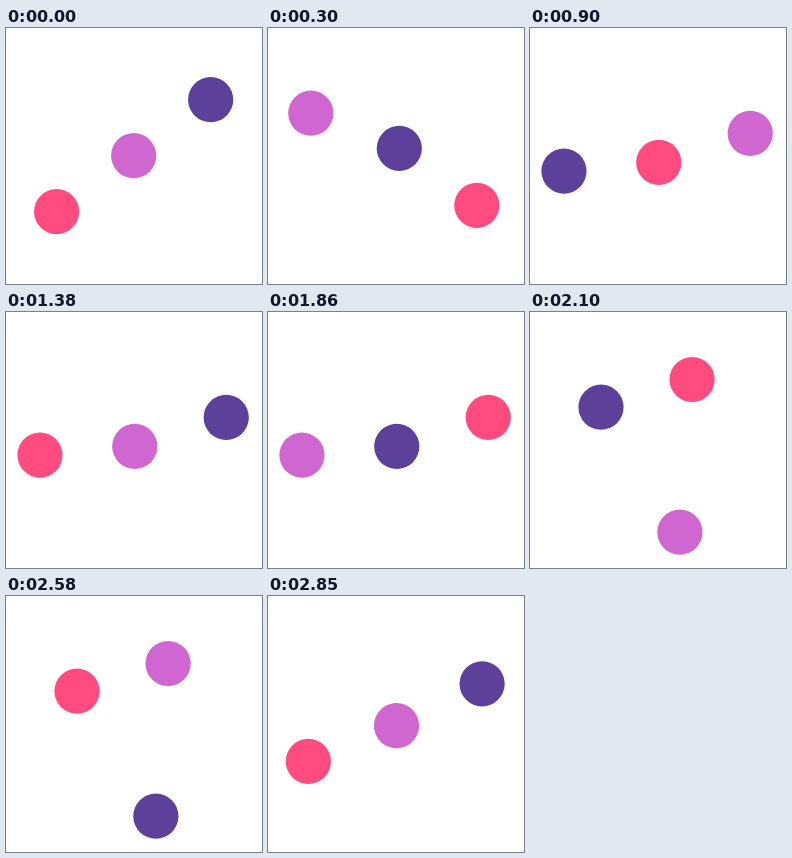
An HTML page for the animation above (2880 ms loop, 256 by 256 pixels).

```html
<!DOCTYPE html>
<html lang="en">
<head>
<meta charset="utf-8">
<title>Three dots</title>
<style>
  html, body { margin: 0; width: 100%; height: 100%; overflow: hidden; background: #fff; }
  svg { display: block; width: 100%; height: 100%; }
</style>
</head>
<body>
<svg viewBox="0 0 256 256">
  <circle r="22.6" fill="#ff4b80"/>
  <circle r="22.6" fill="#5c4099"/>
  <circle r="22.6" fill="#d066cf"/>
</svg>
<script>
  const LAP = 480;          // one half turn of the row
  const STEP = 30;
  const LOOP = 2880;
  const CENTER = 127.65;
  const ARM = 47.6;         // half the gap between neighbours
  const START = 144;
  const PEAK = 0.8;         // when the swap reaches its overshoot
  const OVER = 192;

  const dots = [...document.querySelectorAll('circle')];
  const rad = deg => deg * Math.PI / 180;
  const ease = x => (1 - Math.cos(Math.PI * x)) / 2;

  // Swap angle of a neighbouring pair: swings past 180, then settles.
  const swap = p => p < PEAK
    ? OVER * ease(p / PEAK)
    : OVER + (180 - OVER) * ease((p - PEAK) / (1 - PEAK));

  // Each dot spends one lap on the rim, then two laps swapping inward and across.
  function place(time) {
    const laps = time / LAP % 3;
    const lap = Math.floor(laps);
    const turn = rad(START - 180 * laps);
    const swing = turn + (lap ? rad(swap(laps - lap)) : 0);
    const side = lap === 2 ? -1 : 1;
    return [Math.cos, Math.sin].map(f => CENTER + ARM * (side * f(turn) + f(swing)));
  }

  const begin = performance.now();

  function draw() {
    const elapsed = Math.max(0, performance.now() - begin) % LOOP;
    const time = Math.floor(elapsed / STEP) * STEP;
    dots.forEach((dot, i) => {
      const [x, y] = place(time + i * LAP);
      dot.setAttribute('cx', x.toFixed(2));
      dot.setAttribute('cy', y.toFixed(2));
    });
    requestAnimationFrame(draw);
  }
  draw();
</script>
</body>
</html>
```
